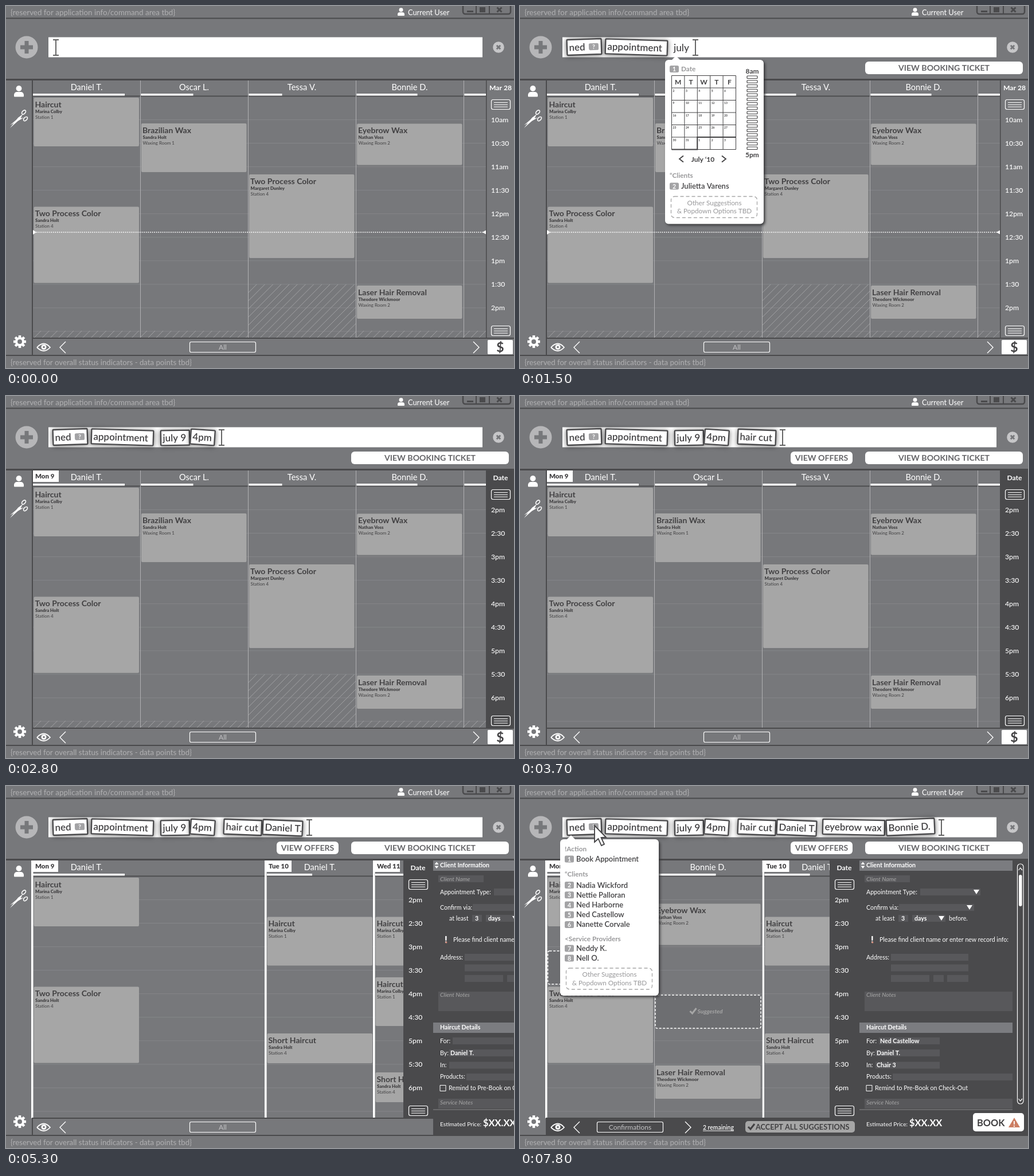
These frames come from a looping animation (886 px wide and 632 px high, 8 s). An HTML page with a canvas:

```html
<!DOCTYPE html>
<html lang="en">
<head>
<meta charset="utf-8">
<title>Booking board</title>
<style>
html, body { margin: 0; width: 100%; height: 100%; overflow: hidden; background: #77787b; }
canvas { display: block; }
</style>
</head>
<body>
<canvas id="stage" width="886" height="632"></canvas>
<script>
const c = document.getElementById('stage').getContext('2d');
const GRAY = '#77787b', DARK = '#4a4a4c', INK = '#414042', CARD = '#a6a6a6', PALE = '#b0b0b2', WHITE = '#fff';
const LOOP = 8000, ROW = 41.05, DATE_W = 52;

const columns = {
  daniel: { name: 'Daniel T.', load: 160, cards: [
    [160, 85, 'Haircut', 'Marina Colby', 'Station 1'],
    [350.5, 133, 'Two Process Color', 'Sandra Holt', 'Station 4']] },
  oscar: { name: 'Oscar L.', load: 91, cards: [[205, 85, 'Brazilian Wax', 'Sandra Holt', 'Waxing Room 1']] },
  tessa: { name: 'Tessa V.', load: 58, cards: [[294, 146, 'Two Process Color', 'Margaret Dunley', 'Station 4']] },
  bonnie: { name: 'Bonnie D.', load: 106, cards: [
    [205.5, 72, 'Eyebrow Wax', 'Nathan Voss', 'Waxing Room 2'],
    [488, 58, 'Laser Hair Removal', 'Theodore Wickmoor', 'Waxing Room 2']] },
  finn: { name: 'Finn W.', load: 39, cards: [] },
  tuesday: { name: 'Daniel T.', load: 79, day: 'Tue 10', cards: [
    [228.5, 85, 'Haircut', 'Marina Colby', 'Station 1'],
    [432, 52, 'Short Haircut', 'Sandra Holt', 'Station 4']] },
  wednesday: { name: 'Daniel T.', load: 120, day: 'Wed 11', cards: [
    [228.5, 85, 'Haircut', 'Marina Colby', 'Station 1'],
    [334, 85, 'Haircut', 'Marina Colby', 'Station 1'],
    [500, 52, 'Short Haircut', 'Sandra Holt', 'Station 4']] }
};
const suggestions = [['daniel', 288], ['bonnie', 365]];

// text, left, top, width, height, tilt in degrees
const tags = [
  ['ned', 81, 57, 62, 29, -2],
  ['appointment', 148, 58, 110, 28, 1.8],
  ['july 9', 269, 59, 52, 28, -1],
  ['4pm', 321, 58, 44, 28, 4],
  ['hair cut', 379, 58, 68, 28, 2.3],
  ['Daniel T.', 447, 59, 71, 28, 2.5],
  ['eyebrow wax', 527, 58, 110, 28, 1.2],
  ['Bonnie D.', 638, 57, 86, 29, -2.5]
];

const team = (oscar, bonnie) =>
  [['daniel', 187.5], ['oscar', oscar], ['tessa', 188], ['bonnie', bonnie], ['finn', 420]];

// Each step changes part of the state and holds until the next one.
const steps = [
  [0, { tags: 0, typed: '', menu: '', ticket: false, offers: false, day: false, start: 10, hatch: true,
        split: false, cols: team(188, 188), edge: 837, hints: 0, mouse: false, filled: false }],
  [200, { typed: 'ned', menu: 'client' }],
  [700, { tags: 1, typed: '', menu: '' }],
  [900, { typed: 'app' }],
  [1100, { typed: 'appointment' }],
  [1300, { tags: 2, typed: '', ticket: true }],
  [1500, { typed: 'july', menu: 'date' }],
  [2000, { typed: 'july 9' }],
  [2200, { tags: 3, typed: '', menu: '', day: true }],
  [2400, { typed: '4' }],
  [2600, { typed: '4pm' }],
  [2800, { tags: 4, typed: '', start: 14 }],
  [3300, { typed: 'hair' }],
  [3500, { typed: 'hair cut' }],
  [3700, { tags: 5, typed: '', offers: true, hatch: false }],
  [3900, { cols: team(125, 125), split: true }],
  [4100, { cols: team(62, 62) }],
  [4300, { cols: [['daniel', 187.5], ['tessa', 188], ['finn', 420]] }],
  [4500, { typed: 'Dan' }],
  [4700, { typed: 'Daniel T.' }],
  [4900, { tags: 6, typed: '', cols: [['daniel', 800]] }],
  [5100, { cols: [['daniel', 600], ['tuesday', 189], ['wednesday', 189]] }],
  [5300, { cols: [['daniel', 407], ['tuesday', 189], ['wednesday', 189]], edge: 693 }],
  [5500, { cols: [['daniel', 187.5], ['', 93], ['tuesday', 186], ['', 200]], edge: 540, hints: 1 }],
  [6000, { typed: 'eyebrow' }],
  [6200, { typed: 'eyebrow wax' }],
  [6400, { tags: 7, typed: '' }],
  [6600, { typed: 'Bon' }],
  [6800, { typed: 'Bonnie D.' }],
  [7000, { tags: 8, typed: '' }],
  [7200, { cols: [['daniel', 187.5], ['bonnie', 191], ['tuesday', 189]], hints: 2 }],
  [7400, { mouse: true }],
  [7600, { menu: 'client' }],
  [7800, { filled: true }]
];
const stateAt = t => Object.assign({}, ...steps.filter(([at]) => at <= t).map(([, change]) => change));

function text(s, x, y, size, color = WHITE, weight = 400, align = 'left', style = '') {
  c.font = `${style} ${weight} ${size}px Lato, "Open Sans", sans-serif`;
  c.fillStyle = color;
  c.textAlign = align;
  c.fillText(s, x, y);
}
function rect(x, y, w, h, color) {
  c.fillStyle = color;
  c.fillRect(x, y, w, h);
}
function box(x, y, w, h, r, fill, stroke, width = 1, dash = []) {
  c.beginPath();
  c.roundRect(x, y, w, h, r);
  if (fill) { c.fillStyle = fill; c.fill(); }
  if (stroke) outline(stroke, width, dash);
}
function outline(color, width, dash = []) {
  c.strokeStyle = color;
  c.lineWidth = width;
  c.setLineDash(dash);
  c.stroke();
  c.setLineDash([]);
}
function path(points, close) {
  c.beginPath();
  points.forEach(([x, y]) => c.lineTo(x, y));
  if (close) c.closePath();
}
function line(points, color, width = 1, dash) { path(points); outline(color, width, dash); }
function shape(points, color) { path(points, true); c.fillStyle = color; c.fill(); }
function disc(x, y, r, color) { c.beginPath(); c.arc(x, y, r, 0, 7); c.fillStyle = color; c.fill(); }
function clipped(x, y, w, h, draw) {
  c.save();
  c.beginPath();
  c.rect(x, y, w, h);
  c.clip();
  draw();
  c.restore();
}
function cross(x, y, r, color, width) {
  line([[x - r, y - r], [x + r, y + r]], color, width);
  line([[x - r, y + r], [x + r, y - r]], color, width);
}
const chevron = (x, y, dx, dy, color, width) => line([[x - dx, y - dy], [x, y], [x - dx, y + dy]], color, width);
const check = (x, y, color) => line([[x, y], [x + 4, y + 4], [x + 11, y - 5]], color, 3);
const dropArrow = (x, y) => shape([[x - 5, y - 4], [x + 5, y - 4], [x, y + 4]], WHITE);

function person(x, y, w) {
  disc(x, y - w * .35, w * .29, WHITE);
  box(x - w / 2, y, w, w * .5, [w * .3, w * .3, 1, 1], WHITE);
}

function frameLines() {
  rect(0, 0, 886, 632, GRAY);
  text('{reserved for application info/command area tbd}', 8, 15.5, 13.4, PALE);
  text('{reserved for overall status indicators - data points tbd}', 8, 627, 13.2, PALE);
  rect(0, 20.5, 886, 2, DARK);
  rect(0, 127, 886, 3, DARK);
  rect(0, 609, 886, 2, DARK);
  rect(45, 130, 2, 479, DARK);
  person(689, 11, 12);
  text('Current User', 701, 16, 12.8);
  box(797, -6, 83, 20, 4, null, DARK, 2.5);
  line([[820, 0], [820, 14]], DARK, 2);
  line([[843, 0], [843, 14]], DARK, 2);
  rect(804, 8, 11, 3, DARK);
  rect(826, 2, 10, 9, DARK);
  cross(860.5, 6.5, 4, DARK, 3);
}

function sideIcons() {
  person(22.5, 150, 17);
  shape([[7, 213], [21, 195], [29, 189], [25, 197]], WHITE);
  shape([[7, 208], [20, 197], [31, 195], [22, 200]], WHITE);
  for (const [x, y] of [[31, 185.5], [34, 197]]) {
    c.beginPath();
    c.ellipse(x, y, 2.6, 4.2, .8, 0, 7);
    outline(WHITE, 1.5);
  }
  for (let i = 0; i < 8; i++) {
    const a = i * Math.PI / 4;
    line([[24, 586], [24 + 11 * Math.cos(a), 586 + 11 * Math.sin(a)]], WHITE, 4.5);
  }
  disc(24, 586, 8, WHITE);
  disc(24, 586, 4, GRAY);
}

function hatch(x, y, w, h) {
  clipped(x, y, w, h, () => {
    for (let i = x - h; i < x + w; i += 14.2) line([[i, y + h], [i + h, y]], '#a1a1a3');
  });
}

function card(x, [y, h, title, client, place]) {
  box(x + 1.5, y, 183.5, h, 2, CARD);
  text(title, x + 3.5, y + 16.5, 14, INK, 700);
  text(client, x + 4, y + 26.5, 7.8, INK, 900);
  text(place, x + 4, y + 36.5, 8, INK);
}

function suggestion(x, y) {
  box(x + 1.5, y, 184, 58, 3, '#6d6e71', WHITE, 1.5, [4, 2.5]);
  check(x + 62, y + 28, CARD);
  text('Suggested', x + 75, y + 32, 10.2, CARD, 700, 'left', 'italic');
}

function dayTab(label, x, split) {
  if (split) rect(x - 3, 130, 3.5, 450, WHITE);
  rect(x - (split ? 3 : 0), 130, split ? 47 : 45, 20, WHITE);
  text(label, x + 4, 143.5, 11.5, INK, 900);
}

function board(s) {
  clipped(43, 130, s.edge - 43, 450, () => {
    for (let i = 0; i < 10; i++) rect(47, 198 + i * ROW, 800, 1, '#858689');
    rect(47, 156.5, 800, 1.8, DARK);
    if (s.hatch) {
      hatch(47, 567, 376, 13);
      hatch(423, 486, 187, 94);
      hatch(610, 567, 227, 13);
    }
    let x = 47;
    s.cols.forEach(([key, width], i) => {
      const col = columns[key], left = x;
      x += width;
      if (i) rect(left - .5, 130, 1, 450, PALE);
      if (!col) return;
      clipped(left - 3, 130, width + 3, 450, () => {
        rect(left + (i ? 1 : 0), 153, Math.min(col.load, width), 3.5, WHITE);
        text(col.name, left + 93.5, 146.5, 14.6, WHITE, 400, 'center');
        col.cards.forEach(item => card(left, item));
        suggestions.slice(0, s.hints).forEach(([owner, y]) => owner === key && suggestion(left, y));
        const day = col.day || (i === 0 && s.day && 'Mon 9');
        if (day) dayTab(day, left, s.split);
      });
    });
    if (!s.day) {
      line([[53, 395], [832, 395]], WHITE, 1.6, [1.8, 1.8]);
      shape([[47, 391], [53, 395], [47, 399]], WHITE);
    }
  });
  if (!s.day) shape([[838, 391], [831, 395], [838, 399]], WHITE);
}

function timeColumn(s) {
  const x = s.edge;
  if (s.day) rect(x, 130, DATE_W, 450, DARK);
  else rect(x, 130, 1.5, 450, DARK);
  text(s.day ? 'Date' : 'Mar 28', x + 25.5, 147, 12.2, WHITE, 700, 'center');
  for (const y of [163.5, 558.5]) {
    box(x + 9.5, y, 33, 17, 3, null, WHITE, 1.2);
    for (let i = 0; i < 3; i++) rect(x + 14, y + 4.5 + i * 3.8, 24, 1, WHITE);
  }
  for (let i = 0; i < 9; i++) {
    const hour = (s.start + (i >> 1) - 1) % 12 + 1, half = i % 2;
    const suffix = s.start + (i >> 1) < 12 ? 'am' : 'pm';
    text(half ? hour + ':30' : hour + suffix, x + 9, 203 + i * ROW, 12.2, WHITE, 500);
  }
}

function bottomBar(s) {
  const active = s.hints > 0;
  if (active) rect(46, 580, 546, 29, DARK);
  rect(45, 579, 841, 2, DARK);
  c.beginPath();
  c.moveTo(54, 596);
  c.quadraticCurveTo(66, 583, 77, 596);
  c.quadraticCurveTo(66, 608, 54, 596);
  outline(WHITE, 1.8);
  disc(66, 595.5, 4.5, WHITE);
  disc(66, 595.5, 1.8, GRAY);
  chevron(94, 596, -10, 10, WHITE, 1.4);
  chevron(active ? 298 : 825, 596, 10, 10, WHITE, 1.4);
  const x = active ? 134.5 : 320.5;
  box(x, 586.5, 115, 18, 2.5, null, WHITE, 1.2);
  text(active ? 'Confirmations' : 'All', x + 57.5, 599.5, 12, '#c4c4c6', 400, 'center');
  if (active) {
    text(s.hints + ' remaining', 319, 600, 10.4, WHITE, 600);
    rect(319, 601.5, 54, 1, WHITE);
    box(393, 585, 191, 20, 5, CARD);
    check(398, 595, INK);
    text('ACCEPT ALL SUGGESTIONS', 411, 600, 12.7, INK, 700);
  } else {
    box(840, 583, 44, 25, 1.5, WHITE);
    text('$', 862, 603.5, 23, INK, 700, 'center');
  }
}

function panel(s) {
  if (s.edge > 800) return;
  const label = (t, x, y, weight) => text(t, x, y, 10.6, WHITE, weight);
  const field = (x, y, w, h = 12) => rect(x, y, w, h, '#58585b');
  const note = (t, y) => text(t, 604, y, 10.2, CARD, 400, 'left', 'italic');
  c.save();
  c.translate(s.edge - 540, 0);
  rect(592, 130, 300, 479, DARK);
  rect(592, 130, 267, 18, '#7b7c80');
  rect(592, 413, 267, 18, '#7b7c80');
  shape([[594.5, 137], [598, 132.5], [601.5, 137]], WHITE);
  shape([[594.5, 139.5], [598, 144], [601.5, 139.5]], WHITE);
  label('Client Information', 604, 142, 700);
  field(601, 156, 79); note('Client Name', 166);
  label('Appointment Type:', 604, 189); field(698, 179, 105); dropArrow(796, 185);
  label('Confirm via:', 604, 216); field(661, 206, 131); dropArrow(784, 212);
  label('at least', 620, 235);
  field(660, 225, 17); label('3', 665, 235, 700);
  field(684, 225, 58); label('days', 688, 235, 700); dropArrow(735, 231);
  label('before.', 748, 235);
  text('!', 612, 274, 16, WHITE, 900);
  disc(614.8, 273, 1.6, '#d58a78');
  label('Please find client name or enter new record info:', 627, 272);
  label('Address:', 604, 303);
  field(647, 293, 135); field(647, 311.5, 135);
  field(647, 330, 67); field(721, 330, 18); field(745, 330, 37);
  field(601, 359, 258, 34); note('Client Notes', 368);
  label('Haircut Details', 604, 425, 700);
  label('For:', 604, 449); field(626, 439, 106);
  label('By:', 604, 470); field(620, 460, 112); label('Daniel T.', 622, 470, 700);
  label('In:', 604, 491); field(620, 481.5, 112);
  if (s.filled) {
    label('Ned Castellow', 628, 449, 700);
    label('Chair 3', 622, 491, 700);
  }
  label('Products:', 604, 511); field(650, 502, 209);
  box(604, 522.5, 10, 10, 0, null, WHITE);
  label('Remind to Pre-Book on Check-Out', 619, 531);
  field(601, 546, 258, 17); note('Service Notes', 556);
  rect(592, 564.5, 267, 1, '#8a8a8c');
  box(867.5, 136, 10.5, 419, 5, null, WHITE, 1.2);
  box(870, 155, 5.5, 55, 3, WHITE);
  line([[869.5, 147], [872.7, 143], [876, 147]], WHITE, 1.2);
  line([[869.5, 546], [872.7, 550], [876, 546]], WHITE, 1.2);
  text('Estimated Price:', 604, 594, 10.2);
  text('$XX.XX', 679, 594, 16.4, WHITE, 700);
  box(790, 571, 89, 32, 5, WHITE);
  text('BOOK', 797, 594, 16.4, INK, 700);
  shape([[862, 579], [872, 596], [852, 596]], '#cc7d62');
  text('!', 862, 595, 13, WHITE, 900, 'center');
  c.restore();
}

function commandBar(s) {
  disc(36, 72, 19.5, '#b6b6b8');
  rect(25, 68.5, 22, 7, GRAY);
  rect(32.5, 61, 7, 22, GRAY);
  rect(74, 54.5, 757, 35, WHITE);
  disc(859, 72, 9.8, '#c6c6c8');
  cross(859, 72, 3.2, GRAY, 3);
  if (s.ticket) button(602, 275, 'VIEW BOOKING TICKET');
  if (s.offers) button(472, 108, 'VIEW OFFERS');
  tags.slice(0, s.tags).forEach(drawTag);

  const last = tags[s.tags - 1], end = last ? last[1] + last[3] : 76;
  let caret = end + 11;
  if (s.typed) {
    text(s.typed, end + 10, 78.5, 17.3, INK, 500);
    caret += 10 + c.measureText(s.typed).width;
  }
  line([[caret, 59], [caret, 86]], '#555', 1.8);
  for (const y of [59, 86]) line([[caret - 5, y], [caret + 5, y]], '#555', 1.8);
}

function button(x, w, label) {
  box(x, 97, w, 22, 6, WHITE);
  text(label, x + w / 2, 113, 14.1, '#656568', 700, 'center');
}

function drawTag([label, x, y, w, h, tilt], i) {
  c.save();
  c.translate(x + w / 2, y + h / 2);
  c.rotate(tilt * Math.PI / 180);
  c.shadowColor = 'rgba(0,0,0,.6)';
  c.shadowBlur = 8;
  c.shadowOffsetY = 1;
  box(-w / 2, -h / 2, w, h, 1, WHITE);
  c.shadowColor = 'transparent';
  box(-w / 2 + 1, -h / 2 + 1, w - 2, h - 2, 1, WHITE, DARK, 2.4);
  text(label, -w / 2 + 4.5, 6, 16.9, INK, 600);
  if (!i) badge('?', 8, -6, 17);
  c.restore();
}

function badge(label, x, y, w = 16) {
  box(x, y, w, 12, 2.5, '#a3a3a5');
  text(label, x + w / 2, y + 10, 10.5, WHITE, 700, 'center');
}

function popup(x, y, w, h, tip) {
  c.save();
  c.shadowColor = 'rgba(50,50,52,.9)';
  c.shadowBlur = 4;
  c.shadowOffsetX = c.shadowOffsetY = 2.5;
  box(x, y, w, h, 6, WHITE);
  c.restore();
  shape([[tip - 8, y + 1], [tip, y - 7], [tip + 8, y + 1]], WHITE);
  box(x + 10.5, y + h - 48, w - 22, 37, 6, null, CARD, 1.3, [6, 4]);
  text('Other Suggestions', x + w / 2, y + h - 33, 11.7, '#98989a', 400, 'center');
  text('& Popdown Options TBD', x + w / 2, y + h - 18.5, 11.7, '#98989a', 400, 'center');
}
const heading = (label, x, y) => text(label, x, y, 11.8, '#98989a', 700);
function option(number, label, x, y) {
  badge(number, x, y - 10.5);
  text(label, x + 20, y, 13, INK, 600);
}

function clientMenu() {
  popup(70, 93, 172, 273, 89);
  heading('!Action', 78, 114);
  heading('“Clients', 78, 158);
  heading('<Service Providers', 78, 270.5);
  [['Book Appointment', 132], ['Nadia Wickford', 177.5], ['Nettie Palloran', 194.7], ['Ned Harborne', 212],
   ['Ned Castellow', 229.2], ['Nanette Corvale', 246.4], ['Neddy K.', 288], ['Nell O.', 305]]
    .forEach(([label, y], i) => option(i + 1, label, 78, y));
}

function dateMenu() {
  popup(253, 94, 172, 286.5, 272);
  badge('1', 261, 104);
  heading('Date', 281, 114);
  const x = 264.5, y = 121.5, w = 22.4, h = 21.5;
  for (let i = 0; i < 6; i++) line([[x + i * w, y], [x + i * w, y + 6 * h]], INK);
  for (let i = 0; i < 7; i++) line([[x, y + i * h], [x + 5 * w, y + i * h]], INK);
  line([[x, y + 6 * h], [x + 2 * w, y + 6 * h], [x + 2 * w, y + 5 * h], [x + 5 * w, y + 5 * h]], INK, 2);
  [...'MTWTF'].forEach((d, i) => text(d, x + (i + .5) * w, 136.5, 12, INK, 700, 'center'));
  for (let i = 0; i < 25; i++) {
    const day = 2 + (i / 5 | 0) * 7 + i % 5;
    text(day > 31 ? day - 31 : day, x + 2 + i % 5 * w, y + h * (1 + (i / 5 | 0)) + 6.5, 5, INK, 700);
  }
  text('8am', 405, 118, 12, INK, 700, 'center');
  text('5pm', 405, 263.5, 12, INK, 700, 'center');
  for (let i = 0; i < 17; i++) box(396, 122 + i * 7.75, 18, 4.5, 1, null, INK, 1.2);
  chevron(278, 267, -7, 5.5, INK, 1.8);
  chevron(359, 267, 7, 5.5, INK, 1.8);
  text('July ‘10', 319, 271.5, 12, INK, 700, 'center');
  heading('“Clients', 261, 300);
  option('2', 'Julietta Varens', 261, 319);
}

function mousePointer() {
  const points = [[130, 69], [130, 98], [136.5, 92], [142, 104], [147, 101.5], [141.5, 90], [150, 89.5]];
  shape(points, WHITE);
  path(points, true);
  outline(INK, 1.8);
}

function draw(t) {
  const s = stateAt(t);
  frameLines();
  board(s);
  timeColumn(s);
  bottomBar(s);
  panel(s);
  sideIcons();
  commandBar(s);
  if (s.menu === 'client') clientMenu();
  if (s.menu === 'date') dateMenu();
  if (s.mouse) mousePointer();
}

const began = performance.now();
function tick() {
  draw((performance.now() - began) % LOOP);
  requestAnimationFrame(tick);
}
tick();
</script>
</body>
</html>
```
